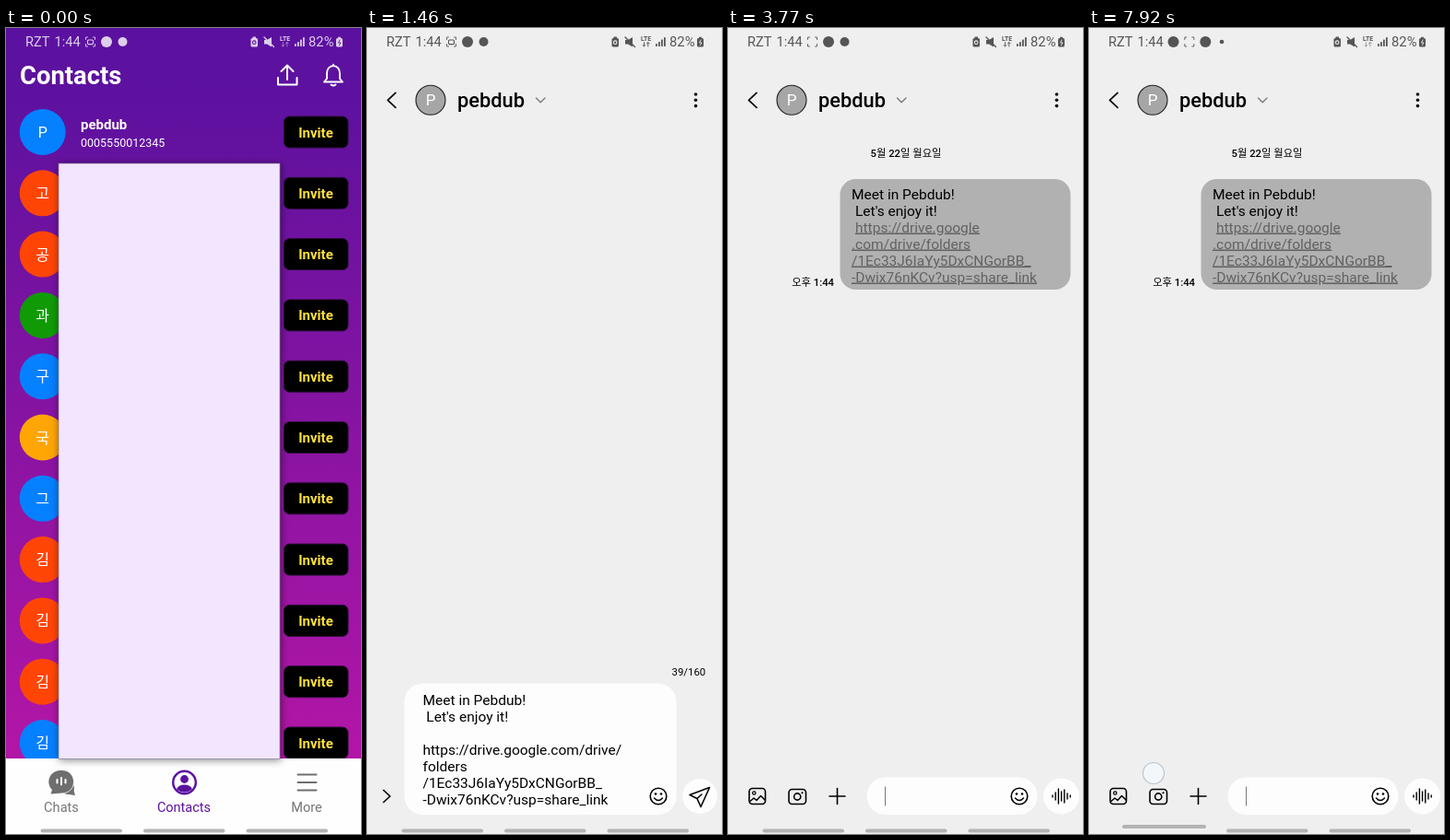
Animation, 385 px wide and 875 px high, one loop 8000 ms. Source, as an HTML page:

```html
<!DOCTYPE html>
<html lang="ko">
<head>
<meta charset="utf-8">
<title>Invite flow</title>
<style>
  html, body { margin: 0; width: 100%; height: 100%; overflow: hidden; background: #efefef; }
  svg { display: block; width: 100vw; height: 100vh; font-family: Roboto, "Noto Sans CJK KR", sans-serif; }
  text { white-space: pre; }
  .bold { font-weight: 700; }
  .medium { font-weight: 500; }
  .mid { text-anchor: middle; }
  .end { text-anchor: end; }
  .line { fill: none; stroke: currentColor; stroke-linecap: round; stroke-linejoin: round; }
  .link { text-decoration: underline; }
</style>
</head>
<body>
<svg id="stage" viewBox="0 0 385 875" preserveAspectRatio="none"></svg>
<script>
const LOOP = 8000;
const NAME = 'pebdub', TITLE = 'Pebdub', CARRIER = 'RZT', PHONE = '0005550012345';

const text = (x, y, size, content, cls = '', fill = 'currentColor') =>
  `<text x="${x}" y="${y}" font-size="${size}" class="${cls}" fill="${fill}">${content}</text>`;
const line = (d, width = 1.7, color = 'currentColor') =>
  `<path class="line" d="${d}" style="stroke-width:${width};color:${color}"/>`;
const circle = (x, y, r, fill = 'currentColor', extra = '') =>
  `<circle cx="${x}" cy="${y}" r="${r}" fill="${fill}" ${extra}/>`;
const rect = (x, y, w, h, r, fill, extra = '') =>
  `<rect x="${x}" y="${y}" width="${w}" height="${h}" rx="${r}" fill="${fill}" ${extra}/>`;
const group = (id, content) => `<g id="${id}">${content}</g>`;
const outline = (width = 1.6) => `stroke="currentColor" stroke-width="${width}"`;

// Contacts screen
const BLUE = '#0580ff', RED = '#ff4505', GREEN = '#109a05', AMBER = '#ffa605';
const PURPLE = '#5b119f', GREY = '#6e6e6e';
const people = [['P', BLUE], ['고', RED], ['공', RED], ['과', GREEN], ['구', BLUE], ['국', AMBER],
  ['그', BLUE], ['김', RED], ['김', RED], ['김', RED], ['김', BLUE]];

const contactRow = ([initial, color], i) => {
  const y = 113 + i * 66.3;
  return circle(39.7, y, 25, color) + text(39.7, y + 6, 16, initial, 'mid', '#fff') +
    rect(301.5, y - 17, 69.5, 34, 6, '#000', 'stroke="#2b1038"') +
    text(336, y + 5.5, 15, 'Invite', 'mid bold', '#ffe238');
};

const contacts = group('contacts',
  rect(0, 0, 385, 875, 0, 'url(#purple)') +
  text(15, 61, 27.4, 'Contacts', 'bold', '#fff') +
  line('M305 56V41M298.5 47L305 40.5 311.5 47M295 54V61.5H315.5V54', 2, '#fff') +
  line('M345 58.5H365L362 55V49C362 38.5 348 38.5 348 49V55ZM352.5 61.5Q355 63.5 357.5 61.5M355 41V39.7', 1.9, '#fff') +
  people.map(contactRow).join('') +
  text(81, 110, 15, NAME, 'bold', '#fff') + text(81, 129, 12.5, PHONE, '', '#fff') +
  rect(0, 793, 385, 82, 0, '#fefefe') +
  circle(67, 825, 7, GREY) + `<path d="M68 832L75 833 73 826Z" fill="${GREY}"/>` +
  `<path d="M60 805.5C78 805.5 78 831 60 831L48 832 49.5 827C42 819 47 805.5 60 805.5Z" fill="${GREY}" stroke="#fefefe" stroke-width=".8"/>` +
  line('M55.5 816V819.5M60 814V821.5M64.5 816V819.5', 2, '#fff') +
  circle(193.5, 819, 12.3, 'none', `stroke="${PURPLE}" stroke-width="2.4"`) +
  circle(193.5, 815.5, 4.4, PURPLE) +
  `<path d="M185 826.5Q187 821.5 193.5 821.5T202 826.5Q193.5 833 185 826.5Z" fill="${PURPLE}"/>` +
  line('M316.5 810.5H336.5M316.5 819H336.5M316.5 827.5H336.5', 2, GREY) +
  text(60, 851, 14.6, 'Chats', 'mid', '#767676') +
  text(193, 851, 14.5, 'Contacts', 'mid', PURPLE) +
  text(326, 851, 14.6, 'More', 'mid', '#767676'));

// Message screen
const header =
  line('M31 70.3L22.5 78.3 31 86.3') +
  circle(69, 78.3, 16, '#a6a6a6', 'stroke="#222" stroke-width="1.1"') +
  text(69, 84.3, 17, 'P', 'mid', '#fff') +
  text(98, 86, 21.8, NAME, 'medium') +
  line('M183.5 76L188.2 80.7 193 76', 1.3, '#777') +
  [72, 78.3, 84.6].map(y => circle(356.5, y, 1.8)).join('');

const smiley = circle(316, 834, 8.8, 'none', outline()) +
  circle(313, 831.5, 1.3) + circle(319, 831.5, 1.3) + line('M311.5 836Q316 841 320.5 836', 1.5);

const draftLines = [[735, `Meet in ${TITLE}!`], [753, " Let's enjoy it!"], [789, 'https://drive.google.com/drive/'],
  [807, 'folders'], [825, '/1Ec33J6IaYy5DxCNGorBB_'], [843, '-Dwix76nKCv?usp=share_link']];

const draft = group('draft',
  text(330.5, 703, 11.4, '39/160') +
  rect(40.5, 711.5, 295, 142.5, 20, '#fdfdfd') +
  draftLines.map(([y, s]) => text(60.5, y, 15.5, s)).join('') +
  rect(261, 830, 1, 16, 0, '#555', 'id="draftCaret"') +
  line('M18 827.5L25 834 18 840.5') +
  circle(361, 834, 19, '#fdfdfd') +
  line('M371.5 824.5L350 832.5 358 836.5 362 845.5ZM358 836.5L363 832', 1.6) + smiley);

const sentLinks = [[138, 'https://drive.google'], [134, '.com/drive/folders'],
  [134, '/1Ec33J6IaYy5DxCNGorBB_'], [134, '-Dwix76nKCv?usp=share_link']];

const bubble = group('bubble',
  text(193, 140, 11.3, '5월 22일 월요일', 'mid medium') +
  rect(121.5, 164, 250, 120, 17, '#b1b1b1') +
  text(134, 185.5, 15.5, `Meet in ${TITLE}!`) + text(138, 203.5, 15.5, "Let's enjoy it!") +
  sentLinks.map(([x, s], i) => text(x, 221.5 + i * 18, 15.5, s, 'link', '#626262')).join('') +
  text(115, 280, 11.3, '오후 1:44', 'end medium'));

const waveBars = [1, 4, 8, 5, 7, 3, 1].map((h, i) => `M${352 + i * 3.2} ${834 - h}v${h * 2}`).join('');

const toolbar = group('toolbar',
  rect(23, 825.5, 17.5, 17, 3.5, 'none', outline()) +
  circle(28.3, 830.5, 1.7, 'none', outline(1.2)) +
  line('M24 839.5L28 836 31 838.5 35.5 833.5 40 838', 1.5) +
  rect(66, 826.5, 18.5, 16, 3.5, 'none', outline()) +
  circle(75.2, 834.5, 3.6, 'none', outline()) + circle(80.5, 830.3, 1.1) +
  line('M110 834H127M118.5 825.5V842.5', 1.6) +
  rect(150.5, 813.5, 185, 40.5, 20, '#fdfdfd') +
  rect(170, 823.5, 1, 21, 0, '#777', 'id="caret"') +
  circle(361.5, 834, 19.5, '#fdfdfd') + line(waveBars, 1.4) + smiley);

const messages = group('messages', rect(0, 0, 385, 875, 0, '#efefef') +
  group('messageBody', header + bubble + draft + toolbar));

// Overlays
const status = group('status',
  text(21, 20, 14.6, CARRIER) + text(52.5, 20, 14.6, '1:44') +
  circle(91.5, 15, 6, 'currentColor', 'id="newAlert"') +
  group('alerts',
    line('M86.5 12.5V10H88.5M94.5 10H96.5V12.5M96.5 17.5V20H94.5M88.5 20H86.5V17.5', .9) +
    rect(88.5, 13, 6, 4.6, 1, 'none', 'id="recDot" stroke="currentColor" stroke-width="1.1"') +
    circle(109, 15, 6)) +
  circle(126.5, 15, 5, 'currentColor', 'id="lastAlert"') +
  rect(265.5, 11, 7.5, 9.5, 1.5, 'currentColor') + rect(267.5, 9.5, 3.5, 2, .5, 'currentColor') +
  circle(269.2, 15.7, 1.8, 'none', 'stroke="var(--hole)" stroke-width="1.1"') +
  '<path d="M280 13H283L288 10V20.5L283 17.5H280Z" fill="currentColor"/>' + line('M280 10L290.5 20.5', 1.4) +
  text(302.5, 13.8, 6.8, 'LTE', 'mid bold') +
  group('arrows', line('M300.5 15.5V20M299 18.5L300.5 20 302 18.5M304.8 20V15.5M303.3 17L304.8 15.5 306.3 17', .9)) +
  [3, 5, 7.5, 10].map((h, i) => rect(313 + i * 3, 20 - h, 1.8, h, .4, 'currentColor')).join('') +
  text(328, 20, 14.8, '82%') +
  rect(358, 11, 7, 9.5, 1.5, 'currentColor') + rect(360, 9.7, 3, 2, .5, 'currentColor') +
  line('M362 13L360.5 16H363L361.5 18.5', .9, 'var(--hole)'));

const mask = rect(57, 147, 240, 646.5, 0, '#f2e5fe',
  'id="mask" stroke="#6d6680" stroke-width=".6" filter="url(#shadow)"');

const pills = ['pill', '', ''].map((id, i) =>
  rect(37.5 + i * 111.5, 869.5, 88.5, 4, 2, '#b3b3b3', id && `id="${id}"`)).join('');

const touch = circle(0, 0, 11.5, '#f3f7fb', 'id="touch" fill-opacity=".9" stroke="#bcc3cc" stroke-width="1.2"');

const stage = document.getElementById('stage');
stage.innerHTML = `<defs>
  <linearGradient id="purple" gradientUnits="userSpaceOnUse" x1="0" y1="0" x2="0" y2="793">
    <stop offset="0" stop-color="#5b119f"/><stop offset=".1" stop-color="#5e119f"/><stop offset="1" stop-color="#b316a6"/>
  </linearGradient>
  <filter id="shadow" x="-10%" y="-5%" width="120%" height="110%">
    <feDropShadow dx="1" dy="1" stdDeviation="4" flood-opacity=".5"/>
  </filter></defs>` +
  contacts + messages + status + mask + pills +
  rect(0, 0, 385, 1.5, 0, '#000', 'id="topEdge"') + touch;

const el = Object.fromEntries([...stage.querySelectorAll('[id]')].map(e => [e.id, e]));

const clamp = v => Math.min(1, Math.max(0, v));
const ramp = (t, from, to) => clamp((t - from) / (to - from));
const easeOut = p => 1 - (1 - p) ** 3;
const within = (t, spans) => spans.some(([a, b]) => t >= a && t < b);
const show = (e, on) => e.setAttribute('visibility', on ? 'inherit' : 'hidden');
const fade = (e, v) => e.setAttribute('opacity', v);
const move = (e, x, y) => e.setAttribute('transform', `translate(${x} ${y})`);

const CARET_ON = [[3400, 4150], [4610, 5080], [5600, 6150], [6600, 7150], [7600, 8000]];
const DRAFT_CARET_ON = [[0, 1420], [1920, 2380]];
const DATA_ACTIVE = [[390, 4530], [5380, 5620], [6380, 7380]];

function render(t) {
  const opening = easeOut(ramp(t, 880, 1080));
  const dark = t >= 1000;
  fade(el.messages, opening);
  move(el.messageBody, 0, t >= 1150 ? 0 : 7 + 90 * (1 - opening));
  show(el.mask, t < 1150);
  show(el.topEdge, t >= 1000 && t < 1150);
  el.status.style.color = dark ? '#555' : '#ddcfeb';
  el.status.style.setProperty('--hole', dark ? '#efefef' : PURPLE);

  const sent = t >= 3150;
  const arriving = easeOut(ramp(t, 3250, 3600));
  show(el.draft, !sent);
  show(el.toolbar, sent);
  fade(el.bubble, arriving);
  move(el.bubble, 0, 60 * (1 - arriving));
  show(el.draftCaret, !sent && within(t, DRAFT_CARET_ON));
  show(el.caret, within(t, CARET_ON));

  const alert = ramp(t, 4380, 4620);
  fade(el.newAlert, alert);
  move(el.alerts, 17.3 * alert, 0);
  el.lastAlert.setAttribute('r', 5 - 2.7 * alert);
  el.lastAlert.setAttribute('cx', 126.5 + 17.5 * alert);
  show(el.recDot, t < 390 || (t >= 1100 && (t - 1100) % 980 < 500));
  fade(el.arrows, within(t, DATA_ACTIVE) ? 1 : .55);

  const swipe = ramp(t, 7640, 7920);
  show(el.touch, t >= 7620);
  move(el.touch, 70, 868 - 59 * swipe);
  el.pill.setAttribute('x', 37.5 - 1.5 * swipe);
  el.pill.setAttribute('width', 88.5 + 2.5 * swipe);
  el.pill.setAttribute('y', 869.5 - 4.5 * swipe);
}

const start = performance.now();
(function tick() {
  render((performance.now() - start) % LOOP);
  requestAnimationFrame(tick);
})();
</script>
</body>
</html>
```
